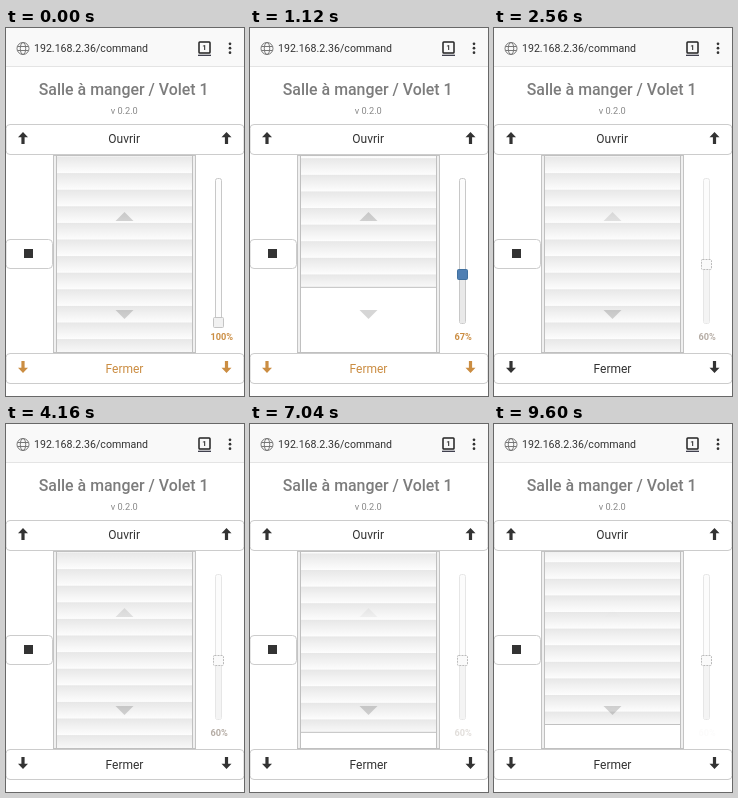
Animation of 238 by 368 pixels, one loop 9760 ms. Source, as an HTML page:

```html
<!DOCTYPE html>
<html lang="fr">
<head>
<meta charset="utf-8">
<title>Volet</title>
<style>
  html, body { margin: 0; width: 100%; height: 100%; overflow: hidden; background: #fff; }
  svg { display: block; width: 238px; height: 368px; font-family: Roboto, sans-serif; }
  .mid { text-anchor: middle; }
  .btn { fill: #fff; stroke: #ccc; }
  .ink { fill: #333; }
  .hint { fill: #000; fill-opacity: .16; }
  #close, #level { fill: #cb8d42; }
  #level { font-weight: 700; font-size: 9.2px; }
  #track { fill: #fcfcfc; stroke: #c8c8c8; }
  #rest { fill: #e9e9e9; }
  #thumb { fill: #f1f1f1; stroke: #c4c4c4; }
  .drag #thumb { fill: #4f7fb3; stroke: #40709f; }
  .busy #close { fill: #333; }
  .busy #level { fill: #8a7c70; }
  .busy #track { fill: #fcfcfc; stroke: #e6e6e6; }
  .busy #rest { fill: #f4f4f4; }
  .busy #thumb { fill: #fafafa; stroke: #bbb; stroke-dasharray: 2 1; }
</style>
</head>
<body>
<svg id="app" viewBox="0 0 238 368">
  <defs>
    <linearGradient id="shade" x1="0" y1="0" x2="0" y2="1">
      <stop offset="0" stop-color="#e7e7e7"/>
      <stop offset="1" stop-color="#fdfdfd"/>
    </linearGradient>
    <pattern id="slats" width="136" height="16.6" patternUnits="userSpaceOnUse" y="-13.4">
      <rect width="136" height="16.6" fill="url(#shade)"/>
    </pattern>
    <clipPath id="pane"><rect x="51" y="128" width="135" height="196"/></clipPath>
    <path id="arrow" d="M0-6 5-.7H1.6V6H-1.6V-.7H-5Z"/>
  </defs>

  <rect width="238" height="38" fill="#f9f9f9"/>
  <path d="M0 38.5H238" stroke="#e4e4e4"/>
  <g fill="none" stroke="#777">
    <circle cx="17" cy="20.5" r="6"/>
    <ellipse cx="17" cy="20.5" rx="2.7" ry="6"/>
    <path d="M11.5 18.5h11M11.5 22.5h11"/>
  </g>
  <text x="28" y="24" font-size="10.6" class="ink">192.168.2.36/command</text>
  <rect x="193" y="14" width="11" height="11" rx=".8" fill="none" stroke="#222" stroke-width="1.5"/>
  <path d="M192 27.3H205" stroke="#2c2c3c" stroke-width="1.2"/>
  <text x="198.5" y="22.2" font-size="7.5" font-weight="700" class="mid ink">1</text>
  <g class="ink">
    <circle cx="224" cy="15.8" r="1.35"/>
    <circle cx="224" cy="20.2" r="1.35"/>
    <circle cx="224" cy="24.7" r="1.35"/>
  </g>

  <text x="117.7" y="66.8" font-size="15.9" font-weight="500" fill="#7c7c7c" class="mid">Salle à manger / Volet 1</text>
  <text x="118.2" y="86" font-size="9.2" fill="#888" class="mid">v 0.2.0</text>

  <rect class="btn" x="0" y="96.5" width="238" height="30" rx="4"/>
  <g class="ink">
    <use href="#arrow" x="17" y="110"/>
    <text x="118.2" y="115.3" font-size="12" class="mid">Ouvrir</text>
    <use href="#arrow" x="220.5" y="110"/>
  </g>

  <rect class="btn" x="0" y="211.5" width="46.5" height="29" rx="4"/>
  <rect class="ink" x="18" y="221" width="9" height="9"/>

  <rect x="47.5" y="127.5" width="142" height="197" fill="#f0f0f0" stroke="#c4c4c4"/>
  <rect x="50.5" y="127.5" width="136" height="197" fill="#fff" stroke="#c0c0c0"/>
  <g clip-path="url(#pane)">
    <g id="blind">
      <rect id="curtain" x="51" y="-200" width="136" fill="url(#slats)"/>
      <path id="rail" d="M51-.5H187" stroke="#c0c0c0"/>
    </g>
  </g>
  <path d="M47 324.5H190" stroke="#c0c0c0"/>
  <path id="up" class="hint" d="M118.5 184 127.5 193H109.5Z"/>
  <path class="hint" d="M118.5 291 127.5 282H109.5Z"/>

  <rect id="track" x="209.5" y="150.5" width="6" height="145" rx="2"/>
  <rect id="rest" x="210" width="5"/>
  <rect id="thumb" x="207.5" y="-5" width="10" height="10" rx="1"/>
  <text id="level" x="204.5" y="311.5"></text>

  <rect class="btn" x="0" y="325.5" width="238" height="30" rx="4"/>
  <g id="close">
    <use href="#arrow" transform="translate(17 339) scale(1 -1)"/>
    <text x="118.5" y="344.8" font-size="12" class="mid">Fermer</text>
    <use href="#arrow" transform="translate(220.5 339) scale(1 -1)"/>
  </g>
</svg>
<script>
  const LOOP = 9760, TICK = 160;
  const GRAB = 480, SETTLE = 1600, RELEASE = 1760, START = 2560;
  const SLAT = 16.6, SILL = 324.5;
  const el = id => document.getElementById(id);
  const [app, blind, curtain, rail, up, rest, thumb, level] =
    ['app', 'blind', 'curtain', 'rail', 'up', 'rest', 'thumb', 'level'].map(el);
  const clamp = v => Math.min(1, Math.max(0, v));
  const moveY = (node, y) => node.setAttribute('transform', `translate(0 ${y.toFixed(2)})`);

  // The wanted opening eases from 100 to 60 while dragged.
  function target(t) {
    const u = clamp((t - GRAB) / (SETTLE - GRAB));
    return Math.round(60 + 40 * (1 - u) ** 2);
  }

  // The real shutter reports 4 % less every two seconds.
  function actual(t) {
    return 100 - 4 * Math.max(0, Math.floor((t - START) / 2000));
  }

  function blink(t) {
    if (t < START) return 1;
    const d = t - 6000;
    const wave = .5 - .5 * Math.cos(2 * Math.PI * d / (d < 0 ? 800 : 880));
    return clamp(wave * 1.07 - .06);
  }

  function draw(t) {
    const busy = t >= RELEASE;
    const want = target(t);
    const edge = 128.5 + 1.96 * (busy ? actual(t) : want);
    // The bottom rail appears once it clears half a slat.
    const open = SILL - edge > SLAT / 2;
    const knob = Math.round(150 + want * 1.44) + .5;
    app.setAttribute('class', busy ? 'busy' : t >= GRAB ? 'drag' : '');
    moveY(blind, edge);
    curtain.setAttribute('height', open ? 200 : 200 + SLAT);
    rail.style.opacity = +open;
    moveY(thumb, knob);
    rest.setAttribute('y', knob);
    rest.setAttribute('height', Math.max(0, 295 - knob));
    level.textContent = want + '%';
    level.style.opacity = up.style.opacity = blink(t);
  }

  const begin = performance.now();
  function frame() {
    const t = (performance.now() - begin) % LOOP;
    draw(Math.floor(t / TICK) * TICK);
    requestAnimationFrame(frame);
  }
  frame();
</script>
</body>
</html>
```
